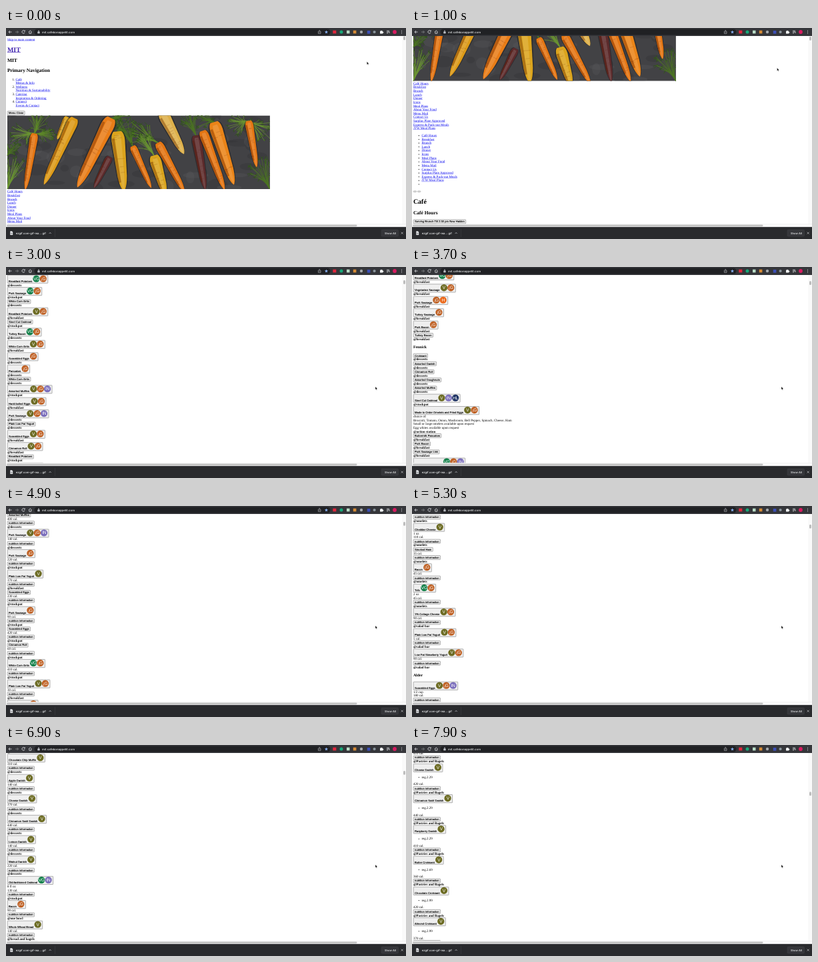
An HTML page that plays this animation: 600 by 317 pixels, repeating every 8 s.

```html
<!DOCTYPE html>
<html lang="en">
<head>
<meta charset="utf-8">
<title>Scrolling a café menu</title>
<style>
  html, body { margin: 0; width: 100%; height: 100%; overflow: hidden; background: #fff; }
  #stage { position: relative; width: 600px; height: 317px; overflow: hidden; background: #fff; }
  #view { position: absolute; left: 0; top: 12px; width: 595px; height: 282.5px; overflow: hidden; }
  #page {
    position: absolute; left: 0; top: 0; width: 1892px; padding: 8px 6px;
    transform-origin: 0 0; color: #000; text-rendering: geometricPrecision;
    font: 16px/18px "Liberation Serif", "Times New Roman", serif;
  }
  #page a { color: #00e; text-decoration: underline; text-decoration-thickness: 1px; }
  #page h1 a { color: #4326b0; text-decoration-thickness: 2px; }
  h1 { line-height: 37px; }
  h2 { line-height: 27px; }
  h3 { line-height: 22px; }
  .photo { display: block; width: 1261px; height: 354px; margin: 1px 0 4px; }
  .btn {
    box-sizing: border-box; width: max-content; height: 21px; padding: 0 5px;
    border: 2px solid #858585; border-radius: 3px; background: #efefef;
    font: 13.333px/17px "Liberation Sans", Arial, sans-serif; white-space: nowrap;
    -webkit-text-stroke: .4px #000;
  }
  .tall { height: 41px; }
  .badge {
    display: inline-block; overflow: hidden; width: 33px; height: 33px; border-radius: 50%;
    color: #fff; font-size: 21px; line-height: 33px; text-align: center; letter-spacing: -1px;
    -webkit-text-stroke: 0;
  }
  .stubs { height: 18px; }
  .stubs i {
    display: inline-block; box-sizing: border-box; width: 16px; height: 7px; margin-right: 4px;
    border: 2px solid #999; border-radius: 3px; background: #efefef;
  }
  #chrome { position: absolute; left: 0; top: 0; }
  #chrome text { font-family: Inter, Roboto, sans-serif; font-weight: 500; fill: #f1f3f4; text-rendering: geometricPrecision; }
</style>
</head>
<body>
<div id="stage">
  <div id="view"><div id="page"></div></div>
  <svg id="chrome" width="600" height="317" viewBox="0 0 600 317">
    <rect x="595" y="12" width="5" height="287" fill="#fafafa"/>
    <path d="M595 12V299" stroke="#e8e8e8" stroke-width=".4"/>
    <rect id="thumb" x="596" y="12.3" width="3" height="6" rx="1.5" fill="#bdbdbd"/>
    <rect y="294.4" width="600" height="4.8" fill="#fafafa"/>
    <path d="M0 294.5H600" stroke="#e4e4e4" stroke-width=".4"/>
    <rect x="1" y="295.4" width="525.5" height="2.8" rx="1.4" fill="#c1c1c1"/>

    <rect width="600" height="12" fill="#35363a"/>
    <rect x="42.5" y="1.4" width="444" height="9.2" rx="4.6" fill="#202124"/>
    <g fill="none" stroke="#dfe1e5" stroke-width=".8">
      <path d="M8.5 6H4M6 4L4 6L6 8"/>
      <path d="M14 6H18.5M16.5 4L18.5 6L16.5 8" stroke="#85878a"/>
      <path d="M28 4.7A2.2 2.2 0 1 0 28.2 6.6M28.3 3.4V5H26.7"/>
      <path d="M34 6L36.3 3.8L38.6 6M34.8 5.6V8.2H37.8V5.6"/>
      <path d="M469 5.2H468.4V8.3H472V5.2H471.4M470.2 7V3.4M469.2 4.4L470.2 3.4L471.2 4.4" stroke-width=".5"/>
      <path d="M571 4.3H575M571 6H575M571 7.7H573M575 7.8V5.5"/>
    </g>
    <path d="M47.3 5.5H50.7V8.2H47.3ZM48 5.5V4.6A1 1 0 0 1 50 4.6V5.5H49.5V4.7A.5 .5 0 0 0 48.5 4.7V5.5Z" fill="#bdc1c6"/>
    <path d="M480.5 3.4L481.2 5.2L483.1 5.3L481.6 6.5L482.1 8.4L480.5 7.3L478.9 8.4L479.4 6.5L477.9 5.3L479.8 5.2Z" fill="#8ab4f8"/>
    <rect x="490.3" y="3.7" width="5" height="4.6" fill="#e0263c"/>
    <circle cx="503" cy="6" r="2.5" fill="#17a878"/>
    <rect x="511" y="3.7" width="4.5" height="4.6" fill="#b9dcc6"/>
    <rect x="520.8" y="3.7" width="4.6" height="4.6" fill="#d58a35"/>
    <circle cx="533" cy="6" r="2.2" fill="#a4a8ac"/>
    <rect x="541.8" y="4" width="4.6" height="4.6" fill="#3c4fb5"/>
    <circle cx="552.6" cy="6" r="2.1" fill="#8a959c"/>
    <path d="M561 4.6H562.2A.9 .9 0 1 1 564 4.6H565.2V5.8A.9 .9 0 1 1 565.2 7.5V8.6H561Z" fill="#f1f3f4"/>
    <circle cx="583" cy="6" r="2.9" fill="#d81b60"/>
    <g fill="#dfe1e5"><circle cx="593.5" cy="4" r=".55"/><circle cx="593.5" cy="6" r=".55"/><circle cx="593.5" cy="8" r=".55"/></g>
    <text x="54" y="7.6" font-size="4.3">mit.cafebonappetit.com</text>

    <rect y="299" width="600" height="18" fill="#292a2d"/>
    <path d="M0 299.2H600" stroke="#45464a" stroke-width=".4"/>
    <path d="M6.3 305.2H8.8L10.2 306.6V311H6.3Z" fill="#e8eaed"/>
    <path d="M7.2 308H9.3M7.2 309.4H9.3" stroke="#292a2d" stroke-width=".5"/>
    <text x="14.8" y="309.6" font-size="4.2">ezgif.com-gif-ma....gif</text>
    <path d="M64.7 308.9L66.2 307.4L67.7 308.9" fill="none" stroke="#dfe1e5" stroke-width=".7"/>
    <path d="M73.5 302V314" stroke="#4a4b4f" stroke-width=".4"/>
    <rect x="563" y="303.2" width="25.5" height="9.8" rx="1.3" fill="#35363a" stroke="#4a4b4f" stroke-width=".4"/>
    <text x="576.4" y="309.6" font-size="4.1" text-anchor="middle">Show All</text>
    <path d="M592.7 306.6L595.7 309.6M595.7 306.6L592.7 309.6" stroke="#dfe1e5" stroke-width=".6"/>
    <path id="cursor" d="M0 0V4.4L1 3.5L1.7 5.1L2.5 4.8L1.8 3.2H3.2Z" fill="#000" stroke="#fff" stroke-width=".35"/>
  </svg>
</div>
<script>
const SCALE = 0.3125, LOOP = 8000, STEP = 100;
const page = document.getElementById('page');
const thumb = document.getElementById('thumb');
const cursor = document.getElementById('cursor');

let seed = 11;
const rand = () => (seed = (seed * 16807) % 2147483647) / 2147483647;
const pick = list => list[Math.floor(rand() * list.length)];
const add = html => page.insertAdjacentHTML('beforeend', html);
const link = text => `<a>${text}</a>`;

// Photo of carrots on slate
function carrot([x, y, tx, ty, w, color]) {
  const len = Math.hypot(tx - x, ty - y), turn = Math.atan2(ty - y, tx - x) * 180 / Math.PI;
  const h = w / 2;
  const body = (dx, dy, k) => `M${dx} ${dy - h * 0.6 * k}Q${h * 0.4} ${dy - h * k} ${h * 1.4} ${dy - h * k}
    L${len * 0.75} ${dy - h * 0.7 * k}Q${len * 0.95} ${dy - h * 0.5 * k} ${len} ${dy}
    Q${len * 0.95} ${dy + h * 0.5 * k} ${len * 0.75} ${dy + h * 0.7 * k}
    L${h * 1.4} ${dy + h * k}Q${h * 0.4} ${dy + h * k} ${dx} ${dy + h * 0.6 * k}Z`;
  let rings = '';
  for (let i = 0; i < 9; i++) rings += `M${len * (0.06 + rand() * 0.75)} ${(rand() - 0.7) * h}v${h * 0.6}`;
  return `<g transform="translate(${x} ${y}) rotate(${turn})">
    <path d="${body(0, 0, 1.2)}" fill="#1c1c1e" opacity=".55"/>
    <path d="${body(0, 0, 1)}" fill="${color}"/>
    <path d="${body(h * 0.5, 0, 0.45)}" fill="#fff" opacity=".13"/>
    <path d="M${h} ${h * 0.75}L${len * 0.85} ${h * 0.45}" stroke="#5a1c00" stroke-opacity=".35" stroke-width="${h * 0.4}"/>
    <path d="${rings}" stroke="#5a1c00" stroke-opacity=".3" stroke-width=".5"/></g>`;
}
function leaves([x, y, tx, ty, spread]) {
  let stems = '', tips = '';
  for (let i = 0; i < 22; i++) {
    const ex = tx + (rand() - 0.5) * spread, ey = ty + (rand() - 0.5) * spread;
    stems += `M${x} ${y}Q${(x + tx) / 2 + (rand() - 0.5) * 6} ${(y + ty) / 2} ${ex} ${ey}`;
    for (let j = 0; j < 3; j++) tips += `M${ex} ${ey}l${(rand() - 0.5) * 9} ${(rand() - 0.5) * 9}`;
  }
  return `<g fill="none" stroke-width=".9"><path d="${tips}" stroke="#31551a"/>
    <path d="${stems}" stroke="${pick(['#5d8729', '#6b9433', '#4d7523'])}" stroke-width=".7"/></g>`;
}
function slate() {
  let spots = '';
  for (let i = 0; i < 60; i++) {
    spots += `<ellipse cx="${rand() * 394}" cy="${rand() * 111}" rx="${4 + rand() * 16}" ry="${2 + rand() * 8}"
      fill="${pick(['#5a5a5c', '#303033'])}" opacity=".3"/>`;
  }
  return `<rect width="394" height="111" fill="#424245"/>${spots}`;
}
function photo() {
  const orange = '#e47512', yellow = '#dba41d', purple = '#5c2a2b';
  const roots = [
    [90, 2, 75, 36, 9, yellow], [41, 27, 27, 112, 12, orange], [101, 4, 55, 104, 16, '#dc9a18'],
    [156, 4, 105, 108, 20, '#e97d18'], [154, 62, 130, 109, 11, purple], [165, 24, 175, 114, 20, yellow],
    [188, 46, 216, 109, 11, orange], [226, 41, 266, 115, 13, orange], [220, 60, 237, 118, 17, yellow],
    [232, -6, 265, 58, 17, '#deb04a'], [283, 30, 297, 112, 14, purple], [293, 23, 326, 112, 14, orange],
    [310, 10, 340, 104, 19, '#ea8418'], [362, 8, 374, 78, 12, orange]];
  const tops = [
    [41, 27, 48, 8, 30], [41, 27, 18, 28, 34], [41, 27, 62, 30, 20], [156, 4, 172, 4, 26], [165, 24, 176, 18, 30],
    [188, 46, 180, 22, 28], [226, 41, 198, 26, 32], [220, 60, 206, 38, 24], [283, 30, 272, 4, 24],
    [310, 10, 296, 6, 28], [362, 8, 345, 14, 30], [362, 8, 380, 22, 34], [394, 111, 380, 80, 32],
    [0, 111, 10, 78, 30], [0, 60, 8, 50, 24]];
  return `<svg class="photo" viewBox="0 0 394 110.6" preserveAspectRatio="none">
    ${slate()}${tops.map(leaves).join('')}${roots.map(carrot).join('')}</svg>`;
}

// Menu items: name | badges | station | extra lines
const BADGES = {
  V: ['V', '#6d6c24'], G: ['¡G', '#bf6023'], HL: ['HL', '#1d3263'],
  VG: ['VG', '#128049'], IN: ['IN', '#7a6dbb'], H: ['H', '#ec6a1c'] };
const badge = key => `<span class="badge" style="background:${BADGES[key][1]}">${BADGES[key][0]}</span>`;
const button = (text, keys = []) =>
  `<div class="btn${keys.length ? ' tall' : ''}">${text} ${keys.map(badge).join('')}</div>`;

function extra(line) {
  if (line.startsWith('reg')) return `<ul><li>${line}</li></ul>`;
  return `<div>${line}</div>` + (line.endsWith('cal.') ? button('nutrition information') : '');
}
function item(row) {
  if (row[0] === '#') return add(`<h3>${row.slice(1)}</h3>`);
  const [name, keys, station, more] = row.split('|');
  add(button(name, keys ? keys.split(' ') : []) +
    (more ? more.split(';').map(extra).join('') : '') + `<div><b>@${station}</b></div>`);
}

const dishes = ['Scrambled Eggs', 'Turkey Bacon', 'Pancakes', 'Egg Whites', 'Hard-boiled Eggs', 'Pork Sausage',
  'Assorted Muffins', 'Steel Cut Oatmeal', 'Breakfast Potatoes', 'Cinnamon Roll', 'Plain Low Fat Yogurt', 'White Corn Grits'];
const pastries = ['Blueberry Muffin', 'Apple Danish', 'Butter Croissant', 'Walnut Danish', 'Lemon Danish', 'Plain Bagel'];
const sets = ['V G', 'V G', 'V', 'G', '', '', 'VG G', 'V G IN'];
const cal = () => 30 + 10 * Math.floor(rand() * 45) + ' cal.';

function fill(goal, kind) {
  while (page.offsetHeight < goal) {
    if (kind === 2) item(`${pick(pastries)}|V|Pastries and Bagels|reg.${pick(['2.29', '2.69', '2.99'])};${cal()}`);
    else item(`${pick(dishes)}|${pick(sets)}|${pick(['breakfast', 'breakfast', 'desserts', 'stockpot'])}|${kind ? cal() : ''}`);
  }
}

// Head of the page
const links = ['Café Hours', 'Breakfast', 'Brunch', 'Lunch', 'Dinner', 'Icons', 'Meal Plans', 'About Your Food',
  'Menu Mail', 'Contact Us', 'Surplus Plate Approved', 'Express &amp; Pack-out Meals', 'JTW Meal Plans'];
const nav = [['Café', 'Menus &amp; Info'], ['Wellness', 'Nutrition &amp; Sustainability'],
  ['Catering', 'Inspiration &amp; Ordering'], ['Connect', 'Events &amp; Contact']];
add(`<div>${link('Skip to main content')}</div><h1>${link('MIT')}</h1><h2>MIT</h2><h2>Primary Navigation</h2>
  <ol>${nav.map(n => `<li>${n.map(link).join('<br>')}</li>`).join('')}</ol>
  ${button('Menu Close')}${photo()}
  ${links.map(t => `<div>${link(t)}</div>`).join('')}
  <ul>${links.map(t => `<li>${link(t)}</li>`).join('')}<li>&nbsp;</li></ul>
  <div class="stubs"><i></i><i></i></div><h1>Café</h1><h2>Café Hours</h2>
  ${button('Serving Brunch Till 2:30 pm New Halden')}`);

// Each stop: filler up to a height, its kind, scroll offset from the first row, rows
const stops = [
  [4480, 0, 29, `Scrambled Eggs|V G|breakfast
Cheesy Scrambled Eggs|V G|breakfast
Turkey Bacon||breakfast
Pancakes|V|breakfast
Egg Whites|V G HL|breakfast
Hard-boiled Eggs|V G|breakfast
Pork Sausage Patty||breakfast
Bacon|G|breakfast|pork
Assorted Pastries and Donuts||desserts
White Corn Grits|VG G HL|stockpot
#Thornwick
Cage Free Scramble Eggs|V G|breakfast
Cage Free Scramble Egg White|V G|breakfast
Hard-boiled Eggs|V G|breakfast
Turkey Bacon|G|breakfast
Pork Sausage|G|breakfast
Breakfast Potatoes with Peppers Onions|VG G|breakfast`],
  [8300, 0, 16, `Breakfast Potatoes|VG G|breakfast
Vegetarian Sausage|V G|breakfast
Pork Sausage|G H|breakfast
Turkey Sausage|G|breakfast
Pork Bacon|G|breakfast
Turkey Bacon||breakfast
#Fennick
Croissant||desserts
Assorted Danish||desserts
Cinnamon Roll||desserts
Assorted Doughnuts||desserts
Assorted Muffins||desserts
Steel Cut Oatmeal|V IN HL|stockpot
Made to Order Omelets and Fried Eggs|V G|action station|choice of:;Broccoli, Tomato, Onion, Mushroom, Bell Pepper, Spinach, Cheese, Ham;Small or large omelets available upon request;Egg whites available upon request
Buttermilk Pancakes||breakfast
Pork Bacon||breakfast
Pork Sausage Link||breakfast
Breakfast Potato Hash|VG G IN|breakfast`],
  [15000, 1, 34, `Mushrooms||omelets|10 cal.
Cheddar Cheese|V|omelets|1 oz;110 cal.
Smoked Ham||omelets|35 cal.
Bacon|G|omelets|45 cal.
Tofu|VG G|omelets|2 oz;45 cal.
1% Cottage Cheese|V G|salad bar|90 cal.
Plain Low Fat Yogurt|V G|salad bar|5 cal.
Low Fat Strawberry Yogurt|V G|salad bar|90 cal.
#Alder
Scrambled Eggs|V G IN|breakfast|1/2 cup;180 cal.`],
  [25600, 1, -4, `Chocolate Chip Muffin|V|desserts|310 cal.
Apple Danish|V|desserts|140 cal.
Cheese Danish|V|desserts|370 cal.
Cinnamon Swirl Danish|V|desserts|440 cal.
Lemon Danish|V|desserts|140 cal.
Walnut Danish|V|desserts|220 cal.
Old-fashioned Oatmeal|VG IN|stockpot|8 fl oz;130 cal.
Bacon|G|one bowl|90 cal.
Whole Wheat Bread|V|bread and bagels|140 cal.`],
  [56000, 2, 97, `Apple Danish|V|Pastries and Bagels|reg.2.29;410 cal.
Cheese Danish|V|Pastries and Bagels|reg.2.29;420 cal.
Cinnamon Swirl Danish|V|Pastries and Bagels|reg.2.29;440 cal.
Raspberry Danish|V|Pastries and Bagels|reg.2.29;410 cal.
Butter Croissant|V|Pastries and Bagels|reg.2.69;360 cal.
Chocolate Croissant|V|Pastries and Bagels|reg.2.99;420 cal.
Almond Croissant|V|Pastries and Bagels|reg.2.99;370 cal.`]];

const poses = [0, 520];
for (const [goal, kind, offset, rows] of stops) {
  fill(goal, kind);
  const before = page.lastElementChild;
  rows.split('\n').forEach(item);
  poses.push(before.nextElementSibling.offsetTop + offset);
}

// Time against progress through the poses
const scroll = [[0, 0], [300, 0], [700, 0.35], [1000, 1], [1150, 1.18], [1300, 1.25], [1600, 1.25],
  [2200, 2], [2500, 2.4], [2900, 2.68], [3300, 2.8], [3400, 2.8], [3700, 3], [3900, 3.2], [4100, 3.26],
  [4800, 3.26], [5300, 4], [5500, 4.2], [5700, 4.26], [5800, 4.26], [6200, 4.68], [6700, 4.93],
  [6900, 5], [7300, 5.5], [7600, 5.83], [7900, 6]];
const pointerX = [[0, 541.3], [1000, 547.6], [1300, 554]];
const pointerY = [[0, 50.5], [900, 58], [1000, 60], [1300, 179.8]];

function at(keys, t) {
  const i = keys.findIndex(k => k[0] > t);
  if (i < 0) return keys[keys.length - 1][1];
  const [t0, a] = keys[i - 1], [t1, b] = keys[i];
  return a + (b - a) * (t - t0) / (t1 - t0);
}
const start = performance.now();
function draw(now) {
  const t = Math.floor((Math.max(0, now - start) % LOOP) / STEP) * STEP;
  const p = at(scroll, t), i = Math.min(Math.floor(p), poses.length - 2);
  const top = poses[i] + (poses[i + 1] - poses[i]) * (p - i);
  page.style.transform = `scale(${SCALE}) translateY(${-top}px)`;
  thumb.setAttribute('y', 12.3 + top * 0.00103);
  cursor.setAttribute('transform', `translate(${at(pointerX, t)} ${at(pointerY, t)})`);
  requestAnimationFrame(draw);
}
draw(start);
</script>
</body>
</html>
```
